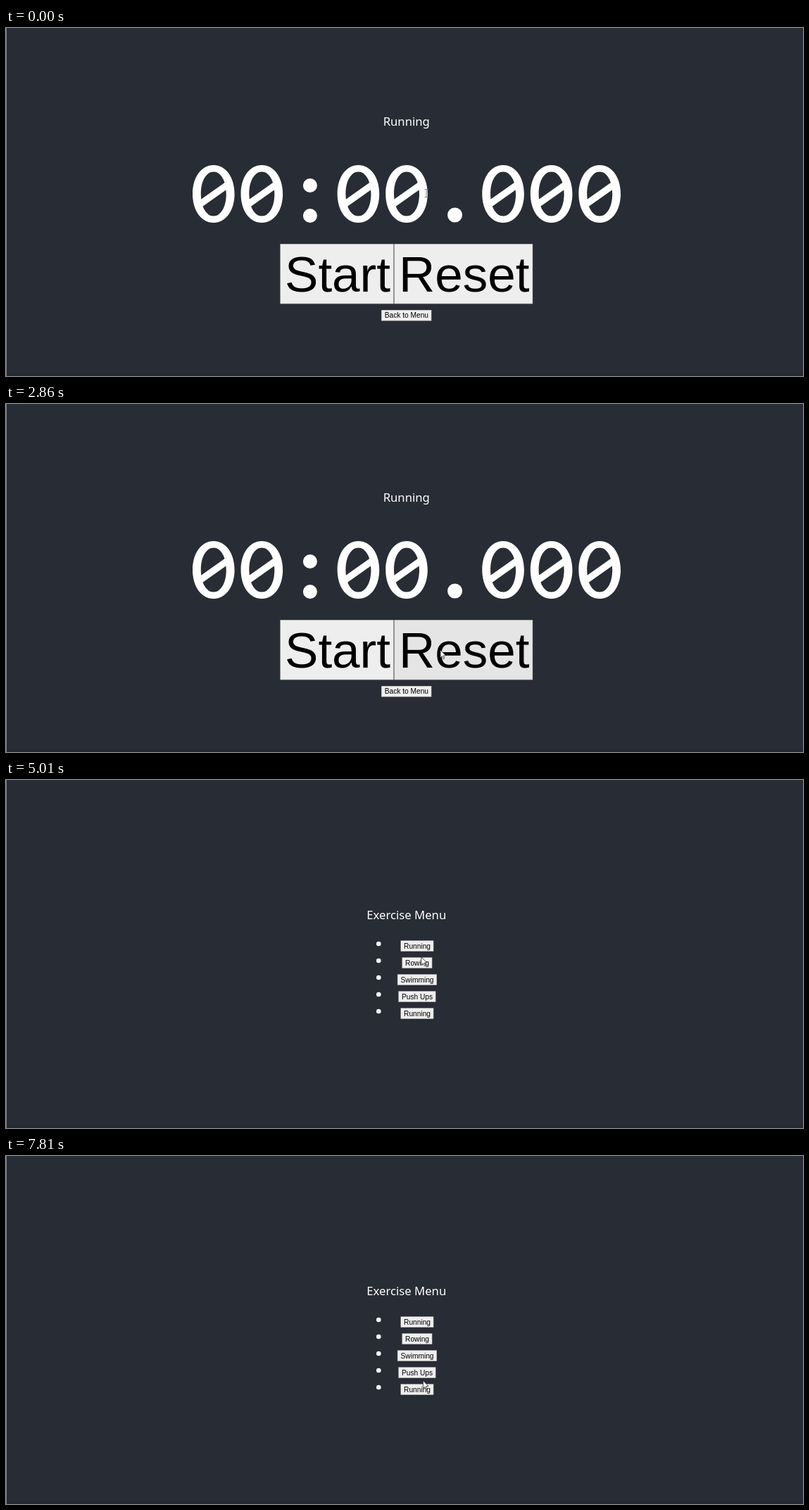
Write an HTML page with a canvas that moves like this. It is 1132 px wide and 495 px high and loops after 8000 ms.

```html
<!DOCTYPE html>
<html lang="en">
<head>
<meta charset="utf-8">
<title>Exercise timer</title>
<style>
  html, body { margin: 0; width: 100%; height: 100%; overflow: hidden; background: #282c34; }
  canvas { display: block; }
</style>
</head>
<body>
<canvas id="stage" width="1132" height="495"></canvas>
<script>
const ctx = document.getElementById('stage').getContext('2d');
const LOOP = 8000;
const REFRESH = 138.5;
const REFRESH_LEAD = 24;
const MOVE_TIME = 400;
const CENTER = 568.75;
const UI_FONT = '"Liberation Sans", Arial, sans-serif';
const TITLE_FONT = '16.7px "Noto Sans", sans-serif';
const DIGIT_FONT = '500 112px "Noto Sans Mono", monospace';

const SCREENS = [
  { from: 0, title: 'Running' },
  { from: 4500, menu: true },
  { from: 5250, title: 'Rowing' },
  { from: 7480, menu: true }
];

const RUNS = [
  { from: 1196.5, to: 2440 },
  { from: 3197, to: 3800 },
  { from: 5618, to: 6480 }
];

const SPOTS = {
  display: { x: 597, y: 235 },
  start: { x: 524, y: 346 },
  reset: { x: 617, y: 350 },
  back: { x: 591, y: 408 },
  rowing: { x: 590, y: 252 },
  swimming: { x: 593, y: 280 }
};

// When the pointer sets off, and where to.
const MOVES = [
  [250, 'reset'], [850, 'start'], [1600, 'reset'], [2750, 'start'], [3250, 'reset'],
  [3900, 'back'], [4550, 'rowing'], [5270, 'start'], [5780, 'reset'], [6500, 'back'],
  [7480, 'swimming']
];

const MENU = ['Running', 'Rowing', 'Swimming', 'Push Ups', 'Running'];

function pointerAt(t) {
  return MOVES.reduce((pos, [from, spot]) => {
    const u = Math.min(1, Math.max(0, (t - from) / MOVE_TIME));
    const ease = u * u * (3 - 2 * u);
    const goal = SPOTS[spot];
    return { x: pos.x + (goal.x - pos.x) * ease, y: pos.y + (goal.y - pos.y) * ease };
  }, SPOTS.display);
}

function label(text, x, y, font, color) {
  ctx.font = font;
  ctx.fillStyle = color;
  ctx.textAlign = 'center';
  ctx.textBaseline = 'alphabetic';
  ctx.fillText(text, x, y);
}

function disc(x, y, r) {
  ctx.beginPath();
  ctx.arc(x, y, r, 0, Math.PI * 2);
  ctx.fill();
}

function polygon(points) {
  ctx.beginPath();
  points.forEach(([x, y]) => ctx.lineTo(x, y));
  ctx.closePath();
}

const bigStyle = fill => ({ size: 71, pad: 12, h: 85.5, fill });
const smallStyle = { size: 10.2, pad: 9.6, h: 15.7, fill: '#efefef' };

function buttonWidth(text, { size, pad }) {
  ctx.font = `${size}px ${UI_FONT}`;
  return ctx.measureText(text).width + pad;
}

// Lays buttons side by side around a centre line.
function buttonRow(texts, center, y, style, pointer) {
  const { size, h, fill } = style;
  const widths = texts.map(text => buttonWidth(text, style));
  let x = center - widths.reduce((sum, w) => sum + w, 0) / 2;
  texts.forEach((text, i) => {
    const w = widths[i];
    const over = pointer.x >= x && pointer.x < x + w && pointer.y >= y && pointer.y < y + h;
    ctx.fillStyle = '#a4a4a4';
    ctx.fillRect(x + 0.3, y, w - 0.6, h);
    ctx.fillStyle = over ? '#e5e5e5' : fill;
    ctx.fillRect(x + 0.8, y + 0.7, w - 1.6, h - 1.4);
    label(text, x + w / 2 + size * 0.014, y + h / 2 + size * 0.355, `${size}px ${UI_FONT}`, '#000');
    x += w;
  });
}

// Closed oval slightly squarer than an ellipse.
function oval(cx, cy, rx, ry) {
  const a = rx * 0.58, b = ry * 0.58;
  ctx.moveTo(cx, cy - ry);
  ctx.bezierCurveTo(cx + a, cy - ry, cx + rx, cy - b, cx + rx, cy);
  ctx.bezierCurveTo(cx + rx, cy + b, cx + a, cy + ry, cx, cy + ry);
  ctx.bezierCurveTo(cx - a, cy + ry, cx - rx, cy + b, cx - rx, cy);
  ctx.bezierCurveTo(cx - rx, cy - b, cx - a, cy - ry, cx, cy - ry);
}

function slashedZero(x) {
  ctx.beginPath();
  oval(x, 236, 29.8, 41);
  oval(x, 236, 18, 31.5);
  ctx.fill('evenodd');
  polygon([[x - 21, 246], [x + 20, 217], [x + 21, 228], [x - 20, 257]]);
  ctx.fill();
}

function footedOne(x) {
  ctx.fillRect(x - 23, 266, 50, 10);
  polygon([[x - 4, 276], [x - 4, 209], [x - 21, 217], [x - 25, 208], [x, 196], [x + 8, 196], [x + 8, 276]]);
  ctx.fill();
}

function digit(ch, x) {
  label(ch, x, 276, DIGIT_FONT, '#fff');
  ctx.strokeStyle = '#fff';
  ctx.lineWidth = 1.4;
  ctx.strokeText(ch, x, 276);
}

function timerText(ms) {
  const pad = (n, len) => String(n).padStart(len, '0');
  return `${pad(Math.floor(ms / 60000), 2)}:${pad(Math.floor(ms / 1000) % 60, 2)}.${pad(ms % 1000, 3)}`;
}

function drawTimer(ms) {
  [...timerText(ms)].forEach((ch, i) => {
    const x = 294.8 + i * 68.55;
    ctx.fillStyle = '#fff';
    if (ch === '0') slashedZero(x);
    else if (ch === '1') footedOne(x);
    else if (ch === '.') disc(x, 266, 10.5);
    else if (ch === ':') { disc(x, 224, 10); disc(x, 267, 10); }
    else digit(ch, x);
  });
}

function drawTimerScreen(title, t, pointer) {
  const run = RUNS.find(r => t >= r.from && t < r.to);
  label(title, CENTER, 139, TITLE_FONT, '#fff');
  drawTimer(run ? Math.round((t - run.from) / 10) * 10 : 0);
  buttonRow([run ? 'Pause' : 'Start', 'Reset'], CENTER, 307, bigStyle(run ? '#eaeaea' : '#eeeeee'), pointer);
  buttonRow(['Back to Menu'], CENTER, 401, smallStyle, pointer);
}

function drawMenu(pointer) {
  label('Exercise Menu', CENTER, 197.5, TITLE_FONT, '#fff');
  MENU.forEach((name, i) => {
    const y = 228.2 + i * 24;
    ctx.fillStyle = '#fff';
    disc(529.3, y + 4.8, 3.3);
    buttonRow([name], 583.9, y, smallStyle, pointer);
  });
}

function drawPointer({ x, y }, overText) {
  ctx.save();
  ctx.translate(x, y);
  if (overText) {
    ctx.fillStyle = '#858890';
    ctx.fillRect(-0.5, -5.5, 1, 11);
    ctx.fillRect(-2.5, -6, 5, 1);
    ctx.fillRect(-2.5, 5, 5, 1);
  } else {
    polygon([[0, 0], [0, 11], [2.5, 8.7], [4.2, 12.5], [5.8, 11.8], [4.2, 8], [7.6, 7.8]]);
    ctx.fillStyle = '#fff';
    ctx.fill();
    ctx.strokeStyle = '#222';
    ctx.lineWidth = 0.8;
    ctx.stroke();
  }
  ctx.restore();
}

function draw(now) {
  const tick = Math.floor((now % LOOP + REFRESH_LEAD) / REFRESH);
  const t = Math.max(0, tick * REFRESH - REFRESH_LEAD);
  const screen = SCREENS.filter(s => s.from <= t).pop();
  const pointer = pointerAt(t);

  ctx.fillStyle = '#282c34';
  ctx.fillRect(0, 0, 1132, 495);
  ctx.fillStyle = '#252931';
  ctx.fillRect(0, 492, 1132, 3);
  ctx.fillStyle = '#7d8086';
  ctx.fillRect(0, 0, 1, 495);

  if (screen.menu) drawMenu(pointer);
  else drawTimerScreen(screen.title, t, pointer);
  drawPointer(pointer, !screen.menu && pointer.y > 185 && pointer.y < 290);
}

function frame() {
  draw(performance.now());
  requestAnimationFrame(frame);
}
frame();
</script>
</body>
</html>
```
